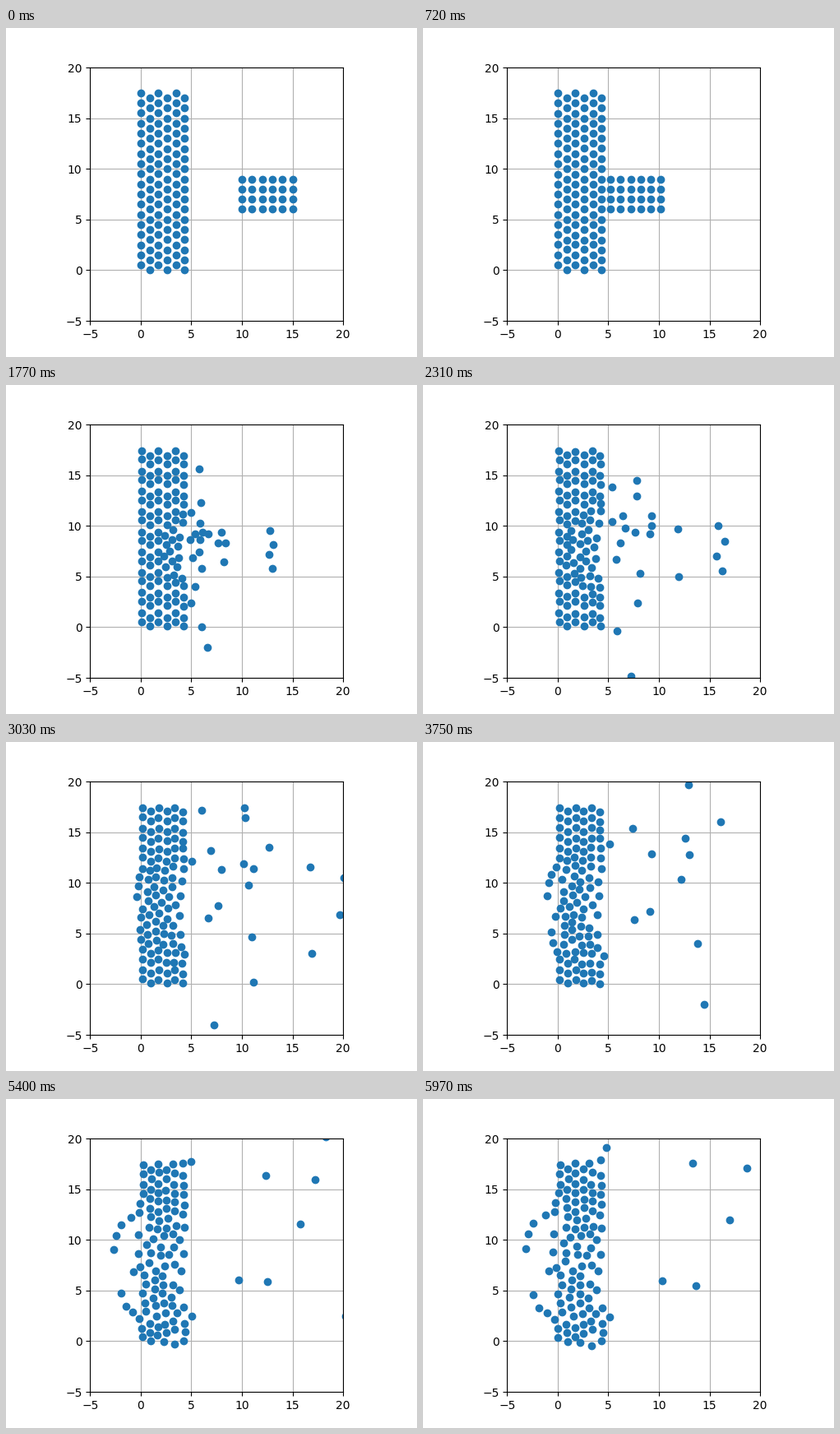
A matplotlib script that plays this animation: 500 px wide and 400 px high, repeating every 6 s.

```python
import numpy as np
import matplotlib.pyplot as plt
from matplotlib.animation import FuncAnimation

FRAMES, INTERVAL = 200, 30
SUBSTEPS = 16
SIGMA = 0.8
BAND = 2.0          # attraction acts only inside horizontal bands
SPEED = 0.2         # block speed, units per frame

# Heavy hexagonal wall and a light square block
wall = [(col * np.sqrt(3) / 2, row + 0.5 * (col % 2 == 0))
        for col in range(6) for row in range(18)]
block = [(x, y) for x in range(10, 16) for y in range(6, 10)]
start = np.array(wall + block, dtype=float)

in_block = np.arange(len(start)) >= len(wall)
mass = np.where(in_block, 1.0, 30.0)
depth = np.where(in_block, 2.5e-5, 4e-4)
eps = np.sqrt(np.outer(depth, depth))


def acceleration(pos):
    x, y = pos.T
    dx = x[:, None] - x
    dy = y[:, None] - y
    r2 = dx * dx + dy * dy
    np.fill_diagonal(r2, 1e6)
    q = SIGMA ** 2 / r2
    s6 = q * q * q
    f = 24 * eps * s6 * (2 * s6 - 1) / r2
    band = np.floor(y / BAND)
    f[(f < 0) & (band[:, None] != band)] = 0
    force = np.column_stack(((f * dx).sum(1), (f * dy).sum(1)))
    return force / mass[:, None]


def simulate():
    pos = start.copy()
    vel = np.zeros_like(pos)
    vel[in_block, 0] = -SPEED
    dt = 1 / SUBSTEPS
    acc = acceleration(pos)
    path = [pos.copy()]
    for _ in range(FRAMES - 1):
        for _ in range(SUBSTEPS):
            vel += acc * dt / 2
            pos += vel * dt
            acc = acceleration(pos)
            vel += acc * dt / 2
        path.append(pos.copy())
    return path


path = simulate()

fig, ax = plt.subplots(figsize=(5, 4), dpi=100)
ax.set_aspect("equal")
ax.set_xlim(-5, 20)
ax.set_ylim(-5, 20)
ax.set_xticks(range(-5, 21, 5))
ax.set_yticks(range(-5, 21, 5))
ax.grid(True)
dots, = ax.plot(*start.T, "o")


def update(i):
    dots.set_data(*path[i].T)
    return dots,


anim = FuncAnimation(fig, update, frames=FRAMES, interval=INTERVAL,
                     repeat=True, repeat_delay=0)
plt.show()
```
